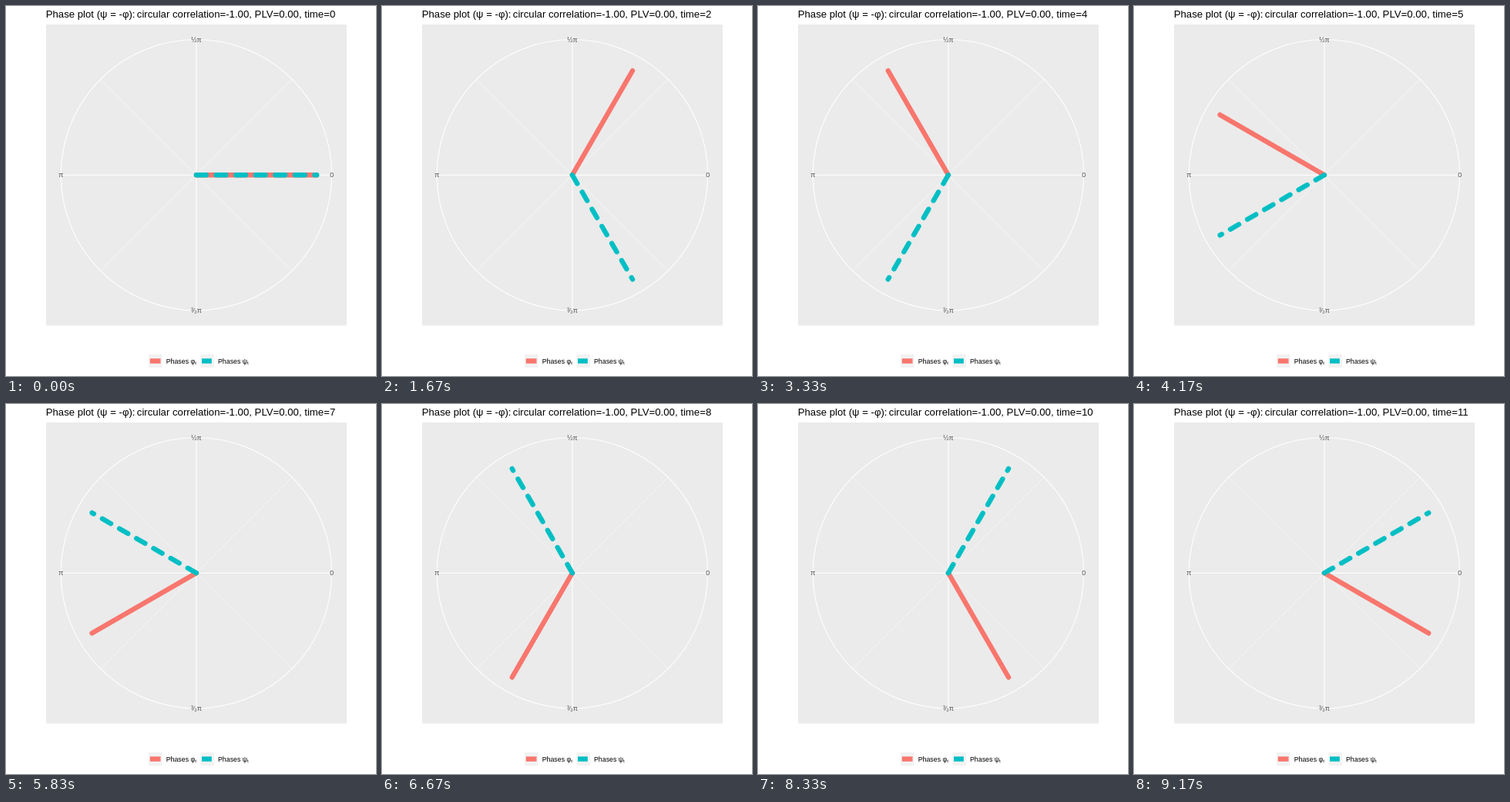
An HTML page that plays this animation: 480 px wide and 480 px high, repeating every 10000 ms.

```html
<!DOCTYPE html>
<html lang="en">
<head>
<meta charset="utf-8">
<title>Phase plot</title>
<style>
  html, body { margin: 0; width: 100%; height: 100%; overflow: hidden; background: #fff; }
  svg { display: block; width: 100%; height: 100%; }
  text { font-family: "Liberation Sans", Arial, sans-serif; font-size: 8.8px; }
  .title { font-size: 13.2px; }
  .ticks { fill: #4d4d4d; text-anchor: middle; }
  .sub { font-size: 6.2px; }
  .grid { fill: none; stroke: #fff; stroke-width: 1.07; }
  .minor { stroke-width: .53; }
  .phase { fill: none; stroke-width: 6.4; }
  .hands { stroke-linecap: round; }
  .phi { stroke: #f8766d; }
  .psi { stroke: #00bfc4; stroke-dasharray: 12.8; }
</style>
</head>
<body>
<svg viewBox="0 0 480 480">
  <text class="title" x="51.7" y="15.4">Phase plot (ψ = -φ):<tspan id="stats" x="169.8"></tspan></text>
  <rect x="52" y="24" width="390" height="390.5" fill="#ebebeb"/>
  <g transform="translate(246.9 219.25)">
    <path class="grid minor" d="M-124.2-124.2L124.2 124.2M-124.2 124.2L124.2-124.2"/>
    <path class="grid" d="M-175.7 0H175.7M0-175.7V175.7"/>
    <circle class="grid" r="175.7"/>
    <g class="hands">
      <path id="phi" class="phase phi"/>
      <path id="psi" class="phase psi"/>
    </g>
    <g class="ticks">
      <text x="175.7" y="3.2">0</text>
      <text x="0" y="-172.5">½π</text>
      <text x="-175.7" y="3.2">π</text>
      <text x="0" y="178.9">³⁄₂π</text>
    </g>
  </g>
  <g transform="translate(185 451.9)">
    <rect width="17.28" height="17.28" fill="#f2f2f2"/>
    <path class="phase phi" d="M1.73 8.64h13.82"/>
    <text x="22.7" y="11.8">Phases φ<tspan class="sub" dy="1.5">t</tspan></text>
  </g>
  <g transform="translate(252.3 451.9)">
    <rect width="17.28" height="17.28" fill="#f2f2f2"/>
    <path class="phase psi" d="M1.73 8.64h13.82"/>
    <text x="22.7" y="11.8">Phases ψ<tspan class="sub" dy="1.5">t</tspan></text>
  </g>
</svg>
<script>
  const LOOP = 10000, STEPS = 12, REACH = 156.2;
  const [stats, phi, psi] = ["stats", "phi", "psi"].map(id => document.getElementById(id));

  // Step times fall on whole hundredths of a second.
  const startOf = step => Math.round(LOOP / STEPS * step / 10) * 10;

  function aim(hand, angle) {
    const x = REACH * Math.cos(angle), y = -REACH * Math.sin(angle);
    hand.setAttribute("d", `M0 0L${x.toFixed(2)} ${y.toFixed(2)}`);
  }

  let shown = -1;

  function draw(ms) {
    const t = ms % LOOP;
    let step = STEPS - 1;
    while (step > 0 && startOf(step) > t) step--;
    if (step === shown) return;
    shown = step;
    const angle = step * 2 * Math.PI / STEPS;
    aim(phi, angle);
    aim(psi, -angle);
    stats.textContent = `circular correlation=-1.00, PLV=0.00, time=${step}`;
  }

  const begin = performance.now();
  function tick() {
    draw(performance.now() - begin);
    requestAnimationFrame(tick);
  }
  tick();
</script>
</body>
</html>
```
